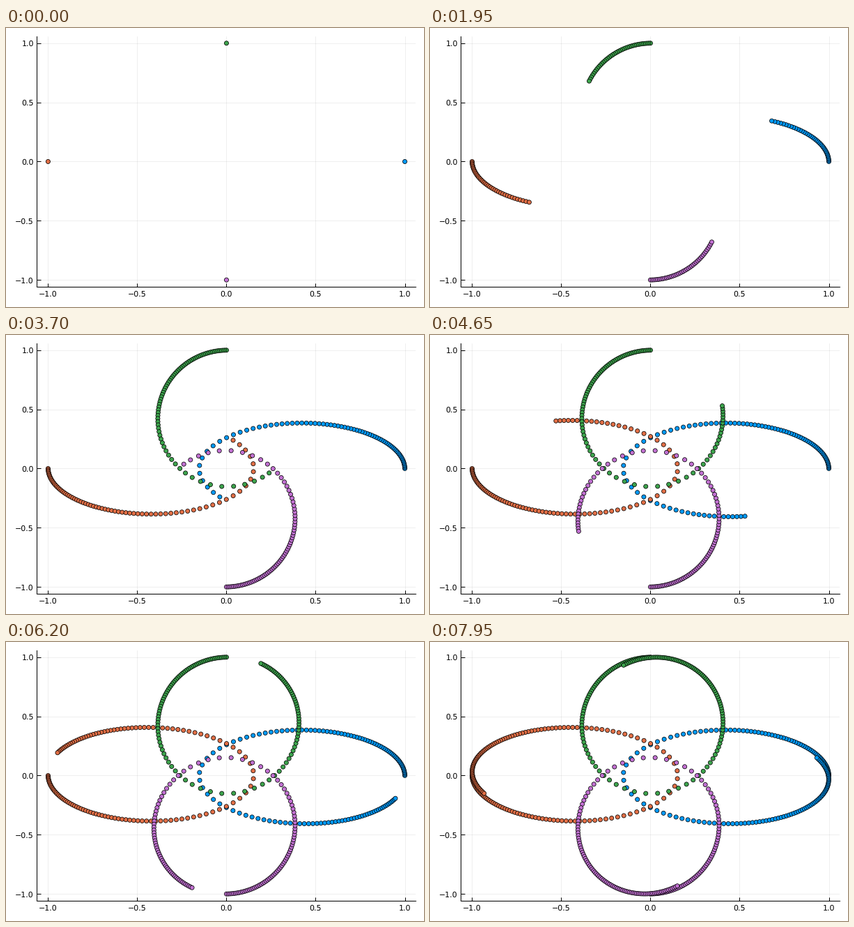
Recreate the animation shown at these times as a matplotlib script. Size 600 px wide and 400 px high, loop 8 s.

```python
import numpy as np
import matplotlib.pyplot as plt
from matplotlib.animation import FuncAnimation

W, H, DPI = 600, 400, 100
PX = 72 / DPI                 # one pixel in points
FRAMES, INTERVAL = 160, 50
DT = 0.02
LEFT, RIGHT, TOP, BOTTOM = 44.4, 588.0, 11.8, 371.4
CX, CY = 316.45, 191.48       # pixel position of the origin
SX, SY = 256.05, 169.7        # pixels per unit
COLORS = ["#009AFA", "#E26F46", "#3DA44D", "#C271D2"]


def accelerations(pos):
    """Mutual gravity of unit masses."""
    d = pos[None, :, :] - pos[:, None, :]
    r2 = (d ** 2).sum(axis=2)
    np.fill_diagonal(r2, 1.0)
    return (d / r2[..., None] ** 1.5).sum(axis=1)


def simulate(steps):
    pos = np.array([[1, 0], [-1, 0], [0, 1], [0, -1]], float)
    vel = 0.5 * np.column_stack([-pos[:, 1], pos[:, 0]])
    path = [pos.copy()]
    for _ in range(steps - 1):
        vel = vel + accelerations(pos) * DT
        pos = pos + vel * DT
        path.append(pos.copy())
    return np.array(path)     # step, body, xy


path = simulate(FRAMES)

plt.rcParams["font.family"] = "DejaVu Sans"
plt.rcParams["text.hinting"] = "none"
fig = plt.figure(figsize=(W / DPI, H / DPI), dpi=DPI, facecolor="white")
ax = fig.add_axes([LEFT / W, 1 - BOTTOM / H, (RIGHT - LEFT) / W, (BOTTOM - TOP) / H])
ax.set_xlim((LEFT - CX) / SX, (RIGHT - CX) / SX)
ax.set_ylim((CY - BOTTOM) / SY, (CY - TOP) / SY)
ticks = np.linspace(-1, 1, 5)
ax.set_xticks(ticks)
ax.set_yticks(ticks)
ax.xaxis.set_major_formatter("{x:.1f}")
ax.yaxis.set_major_formatter("{x:.1f}")
ax.tick_params(direction="in", length=5.5 * PX, width=PX, labelsize=11 * PX)
ax.tick_params(axis="x", pad=4.7 * PX)
ax.tick_params(axis="y", pad=4.6 * PX)
ax.grid(color="black", alpha=0.1, linewidth=0.6 * PX)
ax.set_axisbelow(True)
for side in ("top", "right"):
    ax.spines[side].set_visible(False)
for side in ("left", "bottom"):
    ax.spines[side].set_linewidth(PX)

dots = ax.scatter([], [], s=(6.1 * PX) ** 2, edgecolors="black",
                  linewidths=0.75 * PX, zorder=3, clip_on=False)
dots.set_snap(False)


def draw(i):
    seen = path[:i + 1].transpose(1, 0, 2).reshape(-1, 2)
    dots.set_offsets(seen)
    dots.set_facecolor(np.repeat(COLORS, i + 1))
    return dots,


anim = FuncAnimation(fig, draw, frames=FRAMES, interval=INTERVAL,
                     init_func=lambda: draw(0), repeat=True, repeat_delay=0)
plt.show()
```
